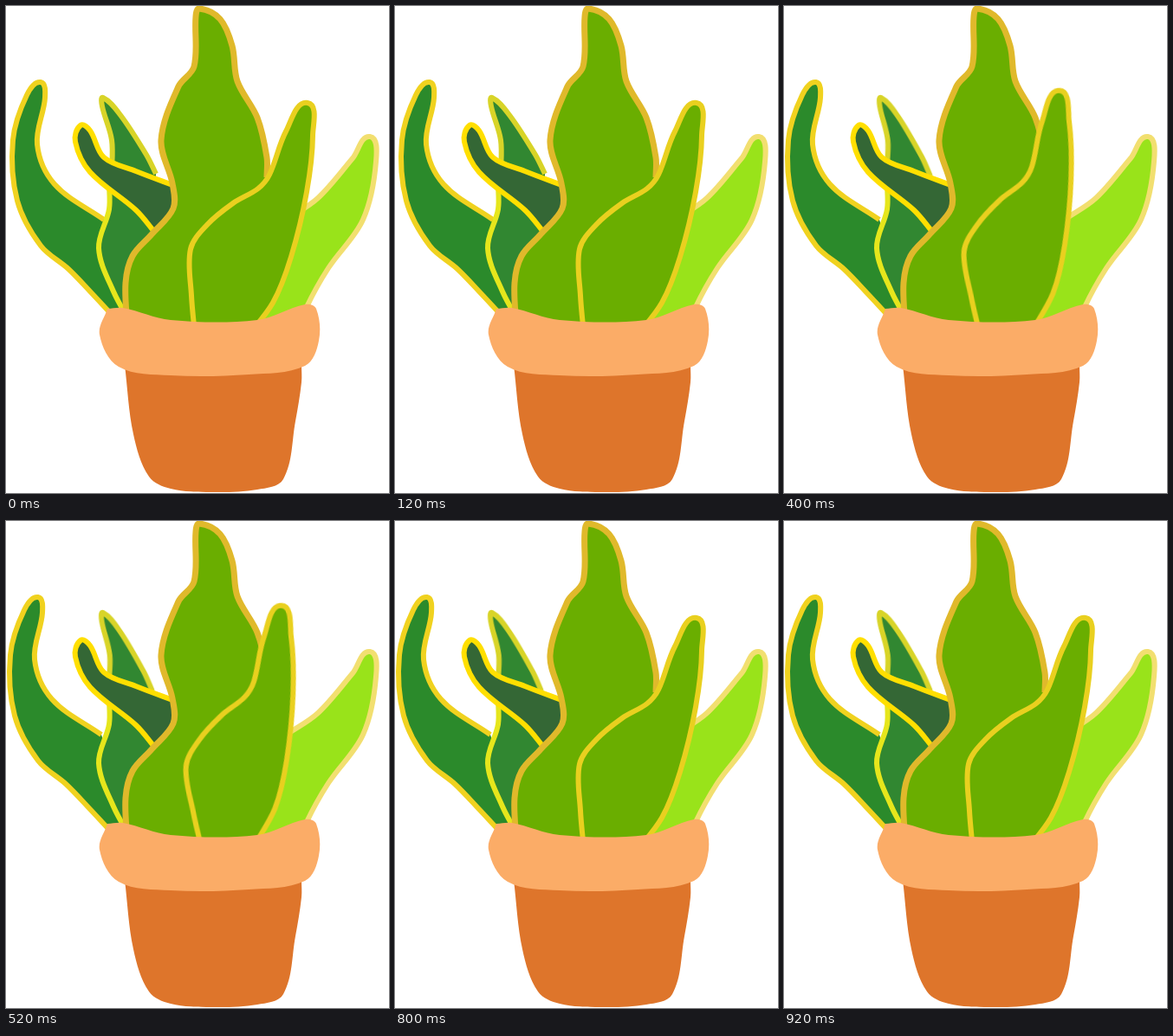
Write an HTML page that moves like this. It is 442 px wide and 563 px high and loops after 1 s.

```html
<!DOCTYPE html>
<html lang="en">
<head>
<meta charset="utf-8">
<title>Potted plant</title>
<style>
  html, body { margin: 0; width: 100%; height: 100%; overflow: hidden; background: #fff; }
  svg { display: block; width: 100%; height: 100%; }
</style>
</head>
<body>
<svg id="stage" viewBox="0 0 442 563" preserveAspectRatio="xMinYMin meet"></svg>
<script>
const LOOP = 1000;
const stage = document.getElementById('stage');

const pairs = text => text.split(' ').map(p => p.split(',').map(Number));
const gap = (a, b) => Math.hypot(b[0] - a[0], b[1] - a[1]) || 1;

// Smooth curve through key points, handles scaled to each segment
function curve(text) {
  const pts = pairs(text);
  const at = i => pts[Math.max(0, Math.min(pts.length - 1, i))];
  const handle = (i, len) => {
    const a = at(i - 1), b = at(i + 1), k = len / 3 / gap(a, b);
    return [(b[0] - a[0]) * k, (b[1] - a[1]) * k];
  };
  let d = 'M' + pts[0];
  for (let i = 0; i < pts.length - 1; i++) {
    const p = pts[i], q = pts[i + 1], len = gap(p, q);
    const h = handle(i, len), g = handle(i + 1, len);
    d += `C${p[0] + h[0]},${p[1] + h[1]} ${q[0] - g[0]},${q[1] - g[1]} ${q}`;
  }
  return d;
}

function add(tag, attrs, parent = stage) {
  const el = document.createElementNS('http://www.w3.org/2000/svg', tag);
  for (const k in attrs) el.setAttribute(k, attrs[k]);
  return parent.appendChild(el);
}

// Holds `move` during the steps marked 1, rests during the others
function sway(el, steps, pivot, move) {
  el.style.transformOrigin = pivot;
  const pose = mark => mark === '1' ? move : 'none';
  const keys = [...steps, steps.at(-1)].map((mark, i) => ({
    transform: pose(mark), offset: i / steps.length, easing: 'steps(1, end)'
  }));
  el.animate(keys, { duration: LOOP, iterations: Infinity });
}

// `edge` is outlined; `base` closes the fill out of sight
function leaf(fill, line, edge, base, width = 6) {
  const g = add('g', {});
  const d = curve(edge);
  add('path', { d: `${d}L${base}Z`, fill }, g);
  add('path', { d, fill: 'none', stroke: line, 'stroke-width': width }, g);
  return g;
}

const solid = (fill, edge) => add('path', { d: curve(edge) + 'Z', fill });

const pale = leaf('#99e31a', '#f2df70',
  '340,372 347,348 372,303 412,247 427,180 420,151 400,176 360,222 325,246',
  '310,300 294,358 298,374');
sway(pale, '01000', '388px 262px', 'translate(0, 3px) rotate(6.2deg)');

const hook = leaf('#2b8a2b', '#f0d21f',
  '136,372 98,331 72,304 40,277 13,225 8,155 24,103 40,88 45,106 36,160 56,206 113,247',
  '130,300 145,372');
sway(hook, '00101', '0 0', 'translate(-3px, 0)');

// The slim leaf's blade turns on its tip while the stem stays put
const blade = leaf('#318731', '#d8d428',
  '122,195 122,155 111,116 112,106 132,126 162,172 173,194', '173,215 130,215');
sway(blade, '00111', '111px 106px', 'rotate(2.6deg)');
leaf('#318731', '#e6e61c',
  '147,372 124,330 107,280 119,235 119,205', '190,210 190,250 160,372');

leaf('#346735', '#ffdf00',
  '195,208 150,191 113,175 97,144 86,138 80,157 97,192 150,236 172,262',
  '195,240 200,215');

leaf('#6aae00', '#e0b92b',
  `140,372 138,320 146,289 168,264 193,234 192,205 179,155 199,93 217,70 219,12
   223,3 247,15 261,46 267,87 290,129 301,175 301,198`.replace(/\s+/g, ' '),
  '290,250 270,372', 7);

const front = leaf('#6aae00', '#e9d01f',
  '218,380 214,335 213,281 232,253 262,228 291,211 304,195 323,145 348,112 354,150 347,215 329,290 308,343 276,385',
  '218,380');
sway(front, '00100', '231px 320px', 'rotate(-8deg)');

solid('#de752b',
  '137,415 147,495 165,544 190,558 237,562 290,559 320,547 334,480 341,435 341,415');
solid('#fbac67',
  '117,350 135,349 190,363 290,363 345,345 358,350 361,387 345,416 280,426 190,427 130,417 108,380 117,350');
</script>
</body>
</html>
```
